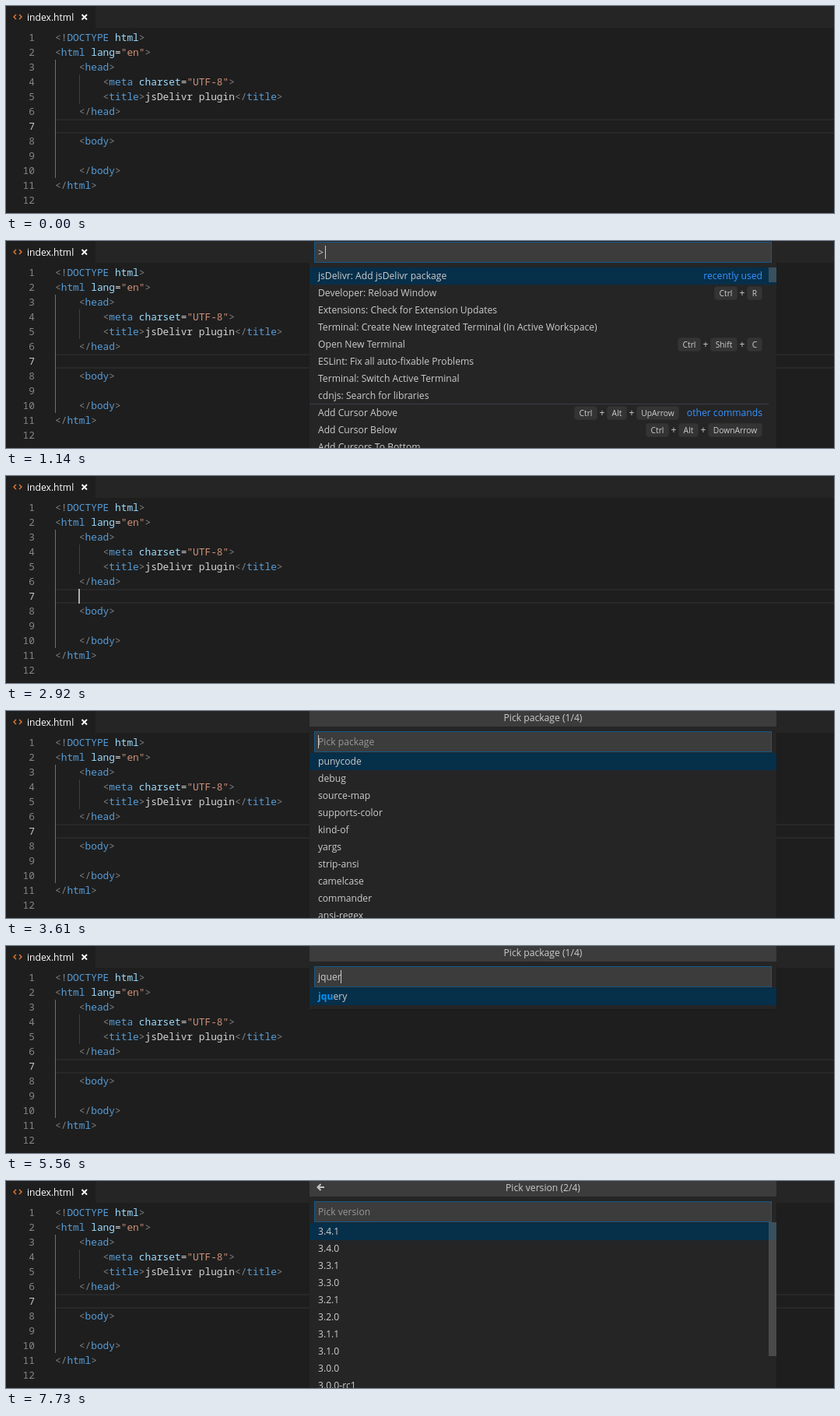
Recreate the animation shown at these times as an HTML page. Size 1064 by 266 pixels, loop 8000 ms.

```html
<!DOCTYPE html>
<html lang="en">
<head>
<meta charset="UTF-8">
<title>Package picker</title>
<style>
  html, body { margin: 0; width: 100%; height: 100%; overflow: hidden; background: #1e1e1e; }
  svg { display: block; }
  text { white-space: pre; font: 12.15px "Open Sans", sans-serif; fill: #ccc; }
  .code text { font: 12.833px "Noto Sans Mono", monospace; fill: #d4d4d4; }
  .code .num { fill: #858585; text-anchor: end; }
  .code .active { fill: #c6c6c6; }
  .punct { fill: #808080; }
  .tag { fill: #569cd6; }
  .attr { fill: #9cdcfe; }
  .str { fill: #ce9178; }
  .match { fill: #0097fb; font-weight: 700; }
  .link { fill: #3794ff; text-anchor: end; }
  .hint { fill: #989898; }
  .mid { text-anchor: middle; }
  .key { font-size: 10.3px; text-anchor: middle; }
</style>
</head>
<body>
<svg width="1064" height="266" viewBox="0 0 1064 266">
  <defs>
    <filter id="blur" filterUnits="userSpaceOnUse" x="370" y="-20" width="640" height="360">
      <feGaussianBlur stdDeviation="3"/>
    </filter>
  </defs>
  <g id="editor"></g>
  <rect id="editorCaret" x="93" y="145" width="2" height="19" fill="#aeafad"/>
  <g id="panel"></g>
  <rect id="inputCaret" width="1" height="17" fill="#ccc"/>
</svg>
<script>
const LOOP = 8000;
const $ = id => document.getElementById(id);
const escapeText = s => s.replace(/&/g, '&amp;').replace(/</g, '&lt;').replace(/>/g, '&gt;');
const rect = (x, y, w, h, fill, extra = '') =>
  `<rect x="${x}" y="${y}" width="${w}" height="${h}" fill="${fill}" ${extra}/>`;
const label = (x, y, content, cls = '') => `<text x="${x}" y="${y}" class="${cls}">${content}</text>`;
const stroke = (d, color, width) => `<path d="${d}" fill="none" stroke="${color}" stroke-width="${width}"/>`;
const span = (cls, s) => `<tspan class="${cls}">${escapeText(s)}</tspan>`;

// Editor
const open = (name, attrs = '') => span('punct', '<') + span('tag', name) + attrs + span('punct', '>');
const close = name => span('punct', '</') + span('tag', name) + span('punct', '>');
const attr = (name, value) => ' ' + span('attr', name) + '=' + span('str', `"${value}"`);
const codeLines = [
  [0, span('punct', '<!') + span('tag', 'DOCTYPE') + span('attr', ' html') + span('punct', '>')],
  [0, open('html', attr('lang', 'en'))],
  [1, open('head')],
  [2, open('meta', attr('charset', 'UTF-8'))],
  [2, open('title') + 'jsDelivr plugin' + close('title')],
  [1, close('head')],
  [0, ''],
  [1, open('body')],
  [0, ''],
  [1, close('body')],
  [0, close('html')],
  [0, '']
];

function drawEditor() {
  const lines = codeLines.map(([indent, html], i) => {
    const y = 45 + 19 * i;
    return label(37, y, i + 1, i === 6 ? 'num active' : 'num') + label(63 + 30.8 * indent, y, html);
  });
  return rect(0, 0, 1064, 28, '#252526') + rect(0, 0, 115, 28, '#1e1e1e')
    + stroke('M13 11L10 14L13 17M17 11L20 14L17 17', '#e37933', 1.4)
    + label(27, 18.5, 'index.html', 'title').replace('<text', '<text style="fill:#fff"')
    + stroke('M97.5 11L104 17.5M104 11L97.5 17.5', '#fff', 1.8)
    + rect(64, 145, 1010, 2, '#282828') + rect(64, 162, 1010, 2, '#282828')
    + rect(63, 69, 1, 152, '#707070') + rect(94, 88, 1, 38, '#404040')
    + `<g class="code">${lines.join('')}</g>`;
}

// Quick input
const commands = [
  'jsDelivr: Add jsDelivr package', 'Developer: Reload Window',
  'Extensions: Check for Extension Updates',
  'Terminal: Create New Integrated Terminal (In Active Workspace)', 'Open New Terminal',
  'ESLint: Fix all auto-fixable Problems', 'Terminal: Switch Active Terminal',
  'cdnjs: Search for libraries', 'Add Cursor Above', 'Add Cursor Below', 'Add Cursors To Bottom'
];
const packages = ['punycode', 'debug', 'source-map', 'supports-color', 'kind-of', 'yargs',
  'strip-ansi', 'camelcase', 'commander', 'ansi-regex'];
const results = ['jquery', 'jquery-ui', 'jquery-ui-dist', 'jquery-validation', '@types/jquery'];
const versions = ['3.4.1', '3.4.0', '3.3.1', '3.3.0', '3.2.1', '3.2.0', '3.1.1', '3.1.0', '3.0.0', '3.0.0-rc1'];
const keyWidths = { Ctrl: 30, Alt: 26, Shift: 35, UpArrow: 55, DownArrow: 70, R: 20, C: 20 };

function keyChips(row, right, keys) {
  const top = 36 + 22 * row;
  let html = '';
  keys.split(' ').reverse().forEach((key, i) => {
    if (i) {
      html += label(right + 6, top + 13, '+', 'mid');
    }
    const w = keyWidths[key];
    html += rect(right - w + .5, top + .5, w - 1, 17, '#343435', 'rx="3" stroke="#2f2f30"')
      + label(right - w / 2, top + 13, key, 'key');
    right -= w + 12;
  });
  return html;
}

const commandExtras = () => rect(390, 209, 590, 1, '#3f3f46')
  + label(972, 49, 'recently used', 'link') + label(972, 225, 'other commands', 'link')
  + keyChips(1, 972, 'Ctrl R') + keyChips(4, 972, 'Ctrl Shift C')
  + keyChips(8, 865, 'Ctrl Alt UpArrow') + keyChips(9, 972, 'Ctrl Alt DownArrow');

function highlight(item, query) {
  const at = query ? item.indexOf(query) : -1;
  if (at < 0) return escapeText(item);
  return escapeText(item.slice(0, at)) + span('match', query) + escapeText(item.slice(at + query.length));
}

function drawPanel({ title, back, hint, value = '', items, query, scroll, extras }) {
  const inputTop = title ? 27 : 2;
  const listTop = title ? 54 : 34;
  const height = listTop + 22 * items.length + 5;
  let html = rect(395, 7, 590, height - 10, '#000', 'filter="url(#blur)"')
    + rect(390, 0, 600, height, '#252526');
  if (title) html += rect(390, 0, 600, 20, '#3c3c3c') + label(690, 13, title, 'mid');
  if (back) html += stroke('M409 8H401M404.5 4L400.5 8L404.5 12', '#c5c5c5', 2);
  html += rect(396.5, inputTop - .5, 587, 26, '#3c3c3c', 'stroke="#135a89"')
    + label(401, inputTop + 17, escapeText(value || hint), value ? '' : 'hint')
    + rect(390, listTop, 600, 22, '#062f4a')
    + items.map((item, i) => label(401, listTop + 15 + 22 * i, highlight(item, query))).join('');
  if (scroll) html += rect(980, listTop - (title ? 1 : 0), 10, scroll, '#797979', 'opacity=".45"');
  return html + (extras ? extras() : '');
}

const pick = { title: 'Pick package (1/4)', hint: 'Pick package', items: packages, caretX: 401 };
const version = { title: 'Pick version (2/4)', hint: 'Pick version', items: versions, back: true, caretX: 401 };
const typed = (value, caretX, items, query) => ({ ...pick, value, caretX, items, query });
const firstResult = results.slice(0, 1);

// A null state shows the editor alone.
const scenes = [
  [0, null],
  [1140, { value: '>', items: commands, scroll: 19, extras: commandExtras, caretX: 410 }],
  [2920, null],
  [3610, pick],
  [5100, typed('j', 404, packages)],
  [5170, typed('j', 404, firstResult, 'j')],
  [5250, typed('jq', 412, firstResult, 'jq')],
  [5330, typed('jqu', 419, firstResult, 'jqu')],
  [5480, typed('jque', 426, firstResult, 'jqu')],
  [5560, typed('jquer', 430, firstResult, 'jqu')],
  [5710, typed('jquer', 430, results, 'jquer')],
  [7180, version],
  [7260, { ...version, scroll: 172 }]
];
const caretOn = [[440, 990], [1140, 1600], [2080, 2610], [2920, 3380], [3610, 4070],
  [4620, 6020], [6570, 7030], [7180, 7730]];

let shown;
function render(t) {
  const state = scenes.findLast(([start]) => t >= start)[1];
  const blink = caretOn.some(([on, off]) => t >= on && t < off);
  if (state !== shown) {
    $('panel').innerHTML = state ? drawPanel(state) : '';
    shown = state;
  }
  $('editorCaret').setAttribute('visibility', blink && !state ? 'visible' : 'hidden');
  $('inputCaret').setAttribute('visibility', blink && state ? 'visible' : 'hidden');
  if (state) {
    $('inputCaret').setAttribute('x', state.caretX);
    $('inputCaret').setAttribute('y', state.title ? 31 : 6);
  }
}

$('editor').innerHTML = drawEditor();
const startTime = performance.now();
function tick() {
  render((performance.now() - startTime) % LOOP);
  requestAnimationFrame(tick);
}
tick();
</script>
</body>
</html>
```
